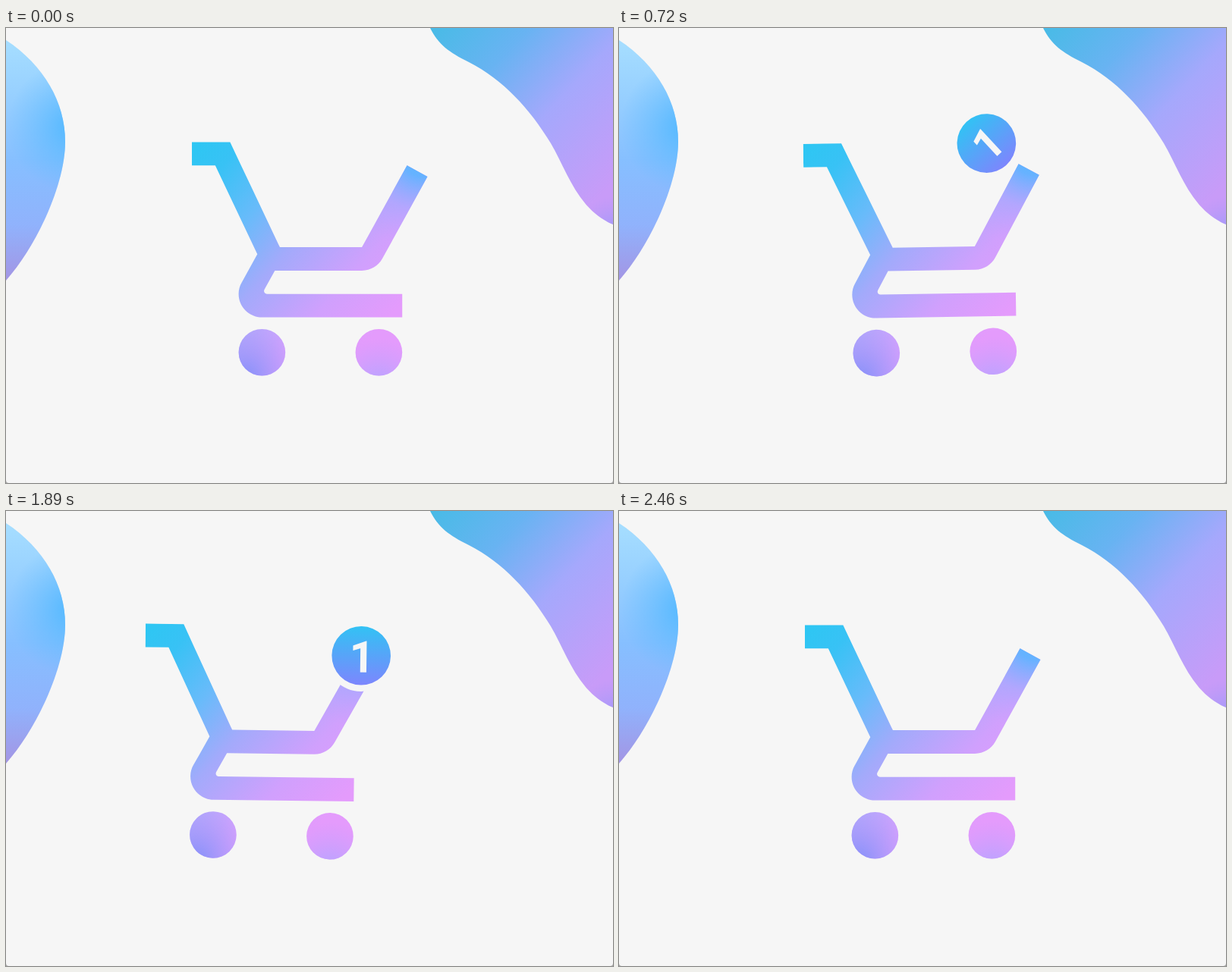
An HTML page that plays this animation: 800 px wide and 600 px high, repeating every 2490 ms.

```html
<!DOCTYPE html>
<html lang="en">
<head>
<meta charset="utf-8">
<title>Cart</title>
<style>
  html, body { margin: 0; width: 100%; height: 100%; overflow: hidden; background: #f6f6f6; }
  svg { display: block; width: 800px; height: 600px; }
  text { font: 700 58px Roboto, sans-serif; text-anchor: middle; fill: #f6f6f6; }
</style>
</head>
<body>
<svg viewBox="0 0 800 600">
  <defs>
    <linearGradient id="body" gradientUnits="userSpaceOnUse" x1="250" y1="160" x2="501.4" y2="386.3">
      <stop offset="0" stop-color="#2fc6f3"/>
      <stop offset=".12" stop-color="#38c2f5"/>
      <stop offset=".33" stop-color="#68bbfa"/>
      <stop offset=".53" stop-color="#a3aafb"/>
      <stop offset=".78" stop-color="#d0a0fd"/>
      <stop offset="1" stop-color="#e49bfc"/>
    </linearGradient>
    <radialGradient id="tip" gradientUnits="userSpaceOnUse" cx="550" cy="165" r="125">
      <stop offset="0" stop-color="#4fb8ff"/>
      <stop offset=".25" stop-color="#62b3ff" stop-opacity=".95"/>
      <stop offset=".6" stop-color="#a4a9ff" stop-opacity=".6"/>
      <stop offset="1" stop-color="#b8a4ff" stop-opacity="0"/>
    </radialGradient>
    <radialGradient id="rear" gradientUnits="userSpaceOnUse" cx="315" cy="462" r="70">
      <stop offset="0" stop-color="#8490f9"/>
      <stop offset="1" stop-color="#9a96f9" stop-opacity="0"/>
    </radialGradient>
    <radialGradient id="front" gradientUnits="userSpaceOnUse" cx="491" cy="475" r="66">
      <stop offset="0" stop-color="#b0a6ff"/>
      <stop offset="1" stop-color="#c4a0ff" stop-opacity="0"/>
    </radialGradient>
    <linearGradient id="coin" x1="0" y1="0" x2="0" y2="1">
      <stop offset="0" stop-color="#32c2f4"/>
      <stop offset="1" stop-color="#7d86fd"/>
    </linearGradient>
    <linearGradient id="leftBase" gradientUnits="userSpaceOnUse" x1="0" y1="16" x2="0" y2="333">
      <stop offset="0" stop-color="#a6deff"/>
      <stop offset=".5" stop-color="#86bfff"/>
      <stop offset=".77" stop-color="#90b2fc"/>
      <stop offset="1" stop-color="#a395e4"/>
    </linearGradient>
    <radialGradient id="leftGlow" gradientUnits="userSpaceOnUse" cx="90" cy="130" r="88">
      <stop offset="0" stop-color="#50b8ff"/>
      <stop offset="1" stop-color="#62bcff" stop-opacity="0"/>
    </radialGradient>
    <linearGradient id="rightBase" gradientUnits="userSpaceOnUse" x1="560" y1="0" x2="790" y2="215">
      <stop offset="0" stop-color="#48bbe6"/>
      <stop offset=".3" stop-color="#68b3f2"/>
      <stop offset=".6" stop-color="#a5a8fc"/>
      <stop offset="1" stop-color="#c89bf8"/>
    </linearGradient>
    <radialGradient id="rightGlow" gradientUnits="userSpaceOnUse" cx="802" cy="278" r="56">
      <stop offset="0" stop-color="#9098fa"/>
      <stop offset="1" stop-color="#b09af8" stop-opacity="0"/>
    </radialGradient>

    <clipPath id="outline">
      <path transform="translate(229.6 119.7) scale(15.4)" d="M9 20a2 2 0 1 1-4 0 2 2 0 0 1 4 0z
        M19 20a2 2 0 1 1-4 0 2 2 0 0 1 4 0z
        M7.17 14.75l.03-.12.9-1.63h7.45c.75 0 1.41-.41 1.75-1.03l3.86-7.01L19.42 4h-.01l-1.1 2-2.76 5H8.53
        l-.13-.27L6.16 6l-.95-2-.94-2H1v2h2l3.6 7.59-1.35 2.45c-.16.28-.25.61-.25.96 0 1.1.9 2 2 2h12v-2H7.42
        c-.13 0-.25-.11-.25-.25z"/>
    </clipPath>
    <g id="cart">
      <g clip-path="url(#outline)">
        <path fill="url(#body)" d="M240 145h320v320H240z"/>
        <path fill="url(#tip)" d="M240 145h320v320H240z"/>
        <path fill="url(#rear)" d="M300 390h75v75h-75z"/>
        <path fill="url(#front)" d="M455 390h75v75h-75z"/>
      </g>
    </g>
    <mask id="notch" maskUnits="userSpaceOnUse" x="-200" y="-200" width="1200" height="1000">
      <path fill="#fff" d="M-200-200h1200v1000H-200z"/>
      <circle id="hole"/>
    </mask>
  </defs>

  <path fill="#f6f6f6" d="M0 0h800v600H0z"/>
  <use id="next" href="#cart"/>
  <g id="current">
    <g mask="url(#notch)"><use id="tilt" href="#cart"/></g>
    <g id="badge">
      <circle r="38.8" fill="url(#coin)"/>
      <text x="1" y="22">1</text>
    </g>
  </g>

  <g id="left">
    <path id="leftBlob" fill="url(#leftBase)" d="M0 16C50 49 78 98 78 150C78 205 42 285 0 333z"/>
    <path fill="url(#leftGlow)" d="M0 16C50 49 78 98 78 150C78 205 42 285 0 333z"/>
  </g>
  <g id="right">
    <path fill="url(#rightBase)" d="M559 0C570 22 584 32 610 45C655 68 690 106 718 152C740 190 754 240 800 259V0z"/>
    <path fill="url(#rightGlow)" d="M559 0C570 22 584 32 610 45C655 68 690 106 718 152C740 190 754 240 800 259V0z"/>
  </g>
  <path fill="#a9a9a9" d="M0 596q0 4 4 4H0zM800 596q0 4-4 4h4z"/>
</svg>
<script>
const LOOP = 2490, STEP = 30;
const HIT = 480, LAND = 840;          // badge bounces in the basket, then lands on the handle
const $ = id => document.getElementById(id);
const clamp = v => Math.min(1, Math.max(0, v));
const span = (t, from, length) => clamp((t - from) / length);
const backIn = (u, s) => (s + 1) * u ** 3 - s * u ** 2;

function place(el, x, angle) {
  el.setAttribute('transform', `translate(${x} 0) rotate(${angle} 400 304.7)`);
}

function drawBadge(t) {
  const now = Math.min(t, LAND), d = now - HIT;
  const x = 393.5 + d * (d < 0 ? 0.1 : 0.3785);
  const y = d < 0 ? 250 - 0.00199 * d * d : 250 - 0.886 * d + 0.001992 * d * d;
  const angle = (now - LAND) * 0.357;
  $('badge').setAttribute('transform', `translate(${x} ${y}) rotate(${angle})`);
  const hole = $('hole');
  hole.setAttribute('cx', x);
  hole.setAttribute('cy', y);
  hole.setAttribute('r', 47.3 * span(t, LAND - 140, 140));
}

function draw(t) {
  drawBadge(t);
  const shake = span(t, HIT, 480);
  place($('tilt'), 0, 6.02 * (1 - shake) ** 2 * Math.sin(shake * 2.4 * Math.PI));

  const out = 900 * backIn(span(t, 1739, 565), 1.70158);
  place($('current'), out, -out / 90);

  const enter = -800 * backIn(1 - span(t, 2142, 318), 1);
  place($('next'), enter, enter / 64);

  // The arriving cart takes over at the end and stands still when the loop restarts.
  $('next').style.display = t < 2142 ? 'none' : '';
}

const start = performance.now();
function tick() {
  const t = (performance.now() - start) % LOOP;
  draw(Math.floor(t / STEP) * STEP);
  requestAnimationFrame(tick);
}
tick();
</script>
</body>
</html>
```
